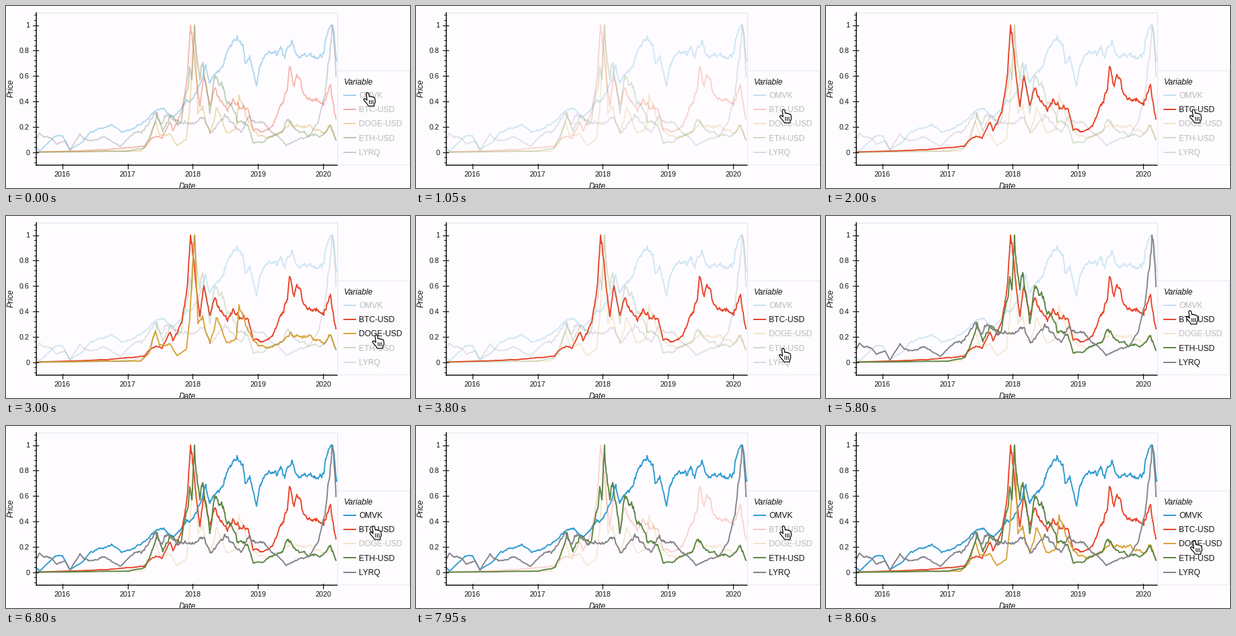
These frames come from a looping animation (600x271 px, 8.65 s). A matplotlib script:

```python
import numpy as np
import matplotlib.pyplot as plt
from matplotlib.animation import FuncAnimation
from matplotlib.patches import Polygon, Rectangle

W, H = 600, 271
STEP, FRAMES = 50, 173
PX = 0.72  # points per pixel at 100 dpi
LEFT, RIGHT, TOP, BOTTOM = 45.3, 491.5, 10, 236.5
ZERO, ONE = 217.7, 28.5
ROW0, ROW_H = 132.7, 21.25
INK, PALE, PAPER = "#111111", "#b9b9bb", "#fefcff"
MUTED, FADE = 0.22, 700

# name, colour, volatility, turning points in stage pixels
SERIES = [
    ("OMVK", "#2f9bd1", 0.014, [
        (45, 211), (50, 216), (72, 195), (84, 193), (95, 214), (114, 202),
        (126, 187), (157, 176), (172, 188), (220, 158), (235, 154), (248, 165),
        (268, 140), (279, 135), (297, 92), (303, 112), (326, 77), (343, 44),
        (352, 57), (355, 85), (362, 74), (372, 119), (377, 90), (408, 60),
        (414, 78), (425, 51), (432, 73), (469, 77), (485, 29), (491, 82)]),
    ("BTC-USD", "#e9452b", 0.024, [
        (45, 217.5), (125, 215), (205, 209), (222, 194), (232, 197), (244, 173),
        (248, 186), (261, 158), (270, 95), (274, 28), (288, 150), (294, 104),
        (303, 148), (311, 122), (329, 157), (337, 138), (347, 152), (360, 154),
        (367, 185), (396, 178), (409, 148), (418, 125), (421, 90), (428, 120),
        (432, 102), (448, 138), (472, 148), (482, 117), (490, 168)]),
    ("DOGE-USD", "#daa43a", 0.03, [
        (45, 217.6), (200, 216), (212, 205), (222, 171), (228, 193), (243, 190),
        (254, 208), (268, 197), (273, 150), (280, 28), (285, 160), (293, 155),
        (303, 190), (312, 152), (329, 188), (342, 183), (346, 132), (356, 163),
        (375, 193), (396, 194), (424, 176), (472, 191), (482, 177), (490, 198)]),
    ("ETH-USD", "#5c8542", 0.03, [
        (45, 217.6), (181, 216.3), (207, 210), (224, 160), (233, 187),
        (243, 164), (260, 172), (273, 92), (276, 110), (280, 28), (288, 110),
        (292, 85), (303, 158), (310, 104), (325, 130), (344, 172), (360, 180),
        (367, 204), (385, 200), (410, 187), (420, 171), (430, 184), (466, 195),
        (482, 178), (490, 200)]),
    ("LYRQ", "#848489", 0.03, [
        (45, 198), (50, 190), (66, 196), (75, 206), (88, 201), (95, 215),
        (110, 190), (122, 201), (148, 196), (170, 209), (196, 187), (223, 159),
        (229, 175), (243, 163), (257, 176), (294, 166), (303, 188), (324, 165),
        (350, 187), (361, 164), (385, 176), (416, 208), (450, 194), (464, 172),
        (474, 130), (484, 28), (490, 105)]),
]

# Fingertip rests: arrival and departure in ms, x, y
RESTS = np.array([
    (0, 300, 537, 129), (1000, 2000, 546, 154), (2400, 3400, 550, 177),
    (3850, 4200, 545, 198), (4600, 4650, 540, 146), (5100, 5450, 546, 217),
    (5900, 6250, 540, 130), (6700, 8200, 546, 149), (8450, 8650, 547, 171),
])
CLICK_TIMES = [1350, 2450, 3350, 4050, 5200, 6100, 6850, 8200, 8500]

HAND = np.array([
    (-2, 1.3), (-1, 0), (0.6, 0), (1.7, 1.3), (2.5, 6), (4, 5.2), (5.6, 6.4),
    (7.2, 5.8), (8.6, 7.2), (10.2, 7.2), (11, 9), (11.4, 14), (10, 17),
    (9.7, 20), (1.3, 20), (-0.5, 17), (-4.8, 12.2), (-5.8, 9.8), (-4, 8.8),
    (-0.8, 11.2),
])
CREASES = [np.array([(x, 11.5), (x + 0.3, 16.5)]) for x in (2.6, 5.2, 7.8)]

plt.rcParams["font.family"] = "Liberation Sans"
fig = plt.figure(figsize=(W / 100, H / 100), dpi=100, facecolor=PAPER)
ax = fig.add_axes([0, 0, 1, 1])
ax.set_xlim(0, W)
ax.set_ylim(H, 0)
ax.axis("off")


def line(xs, ys, color, width, z=2, **kw):
    return ax.plot(xs, ys, color=color, lw=width * PX, zorder=z, **kw)[0]


def label(x, y, s, size=12, **kw):
    kw = {"color": INK, "va": "baseline", **kw}
    return ax.text(x, y, s, fontsize=size * PX, zorder=6, **kw)


def price_path(points, vol, seed):
    """Random walk pinned to the turning points, rougher at higher prices."""
    px, py = np.array(points).T
    x = np.union1d(np.arange(px[0], px[-1], 0.8), px)
    walk = np.random.default_rng(seed).normal(size=x.size).cumsum()
    walk -= np.interp(x, px, np.interp(px, x, walk))
    y = np.interp(x, px, py)
    return x, np.clip(y + vol * walk * (ZERO - y), ONE, ZERO)


def draw_axes():
    line([LEFT, RIGHT, RIGHT], [TOP, TOP, BOTTOM], "#e4e2e6", 1, 1)
    line([LEFT, LEFT], [TOP, BOTTOM], INK, 1.5, 4)
    line([LEFT, RIGHT], [BOTTOM, BOTTOM], INK, 1.5, 4)
    for k in range(-2, 28):
        y = ZERO - 0.04 * k * (ZERO - ONE)
        if k % 5:
            line([42, LEFT], [y, y], INK, 1, 4)
        else:
            line([39.5, 47.5], [y, y], INK, 1.2, 4)
            label(35, y + 3.8, f"{0.04 * k:.1g}", 10.8, ha="right")
    for k in range(5):
        x = 83.8 + 96.8 * k
        line([x, x], [234.5, 242], INK, 1.2, 4)
        label(x, 254.5, str(2016 + k), 10.8, ha="center")
    label(269, 272, "Date", style="italic", ha="center")
    label(7.3, 122.5, "Price", style="italic", rotation=90, ha="center", va="center")


def draw_series():
    ax.add_patch(Rectangle((492, 96), 106.5, 140, fc=PAPER, ec="#e9e7ec",
                           lw=PX, zorder=5))
    label(502, 117, "Variable", style="italic")
    rows = []
    for i, (name, color, vol, points) in enumerate(SERIES):
        y = ROW0 + ROW_H * i
        plot = line(*price_path(points, vol, i + 3), color, 1.9, 2 + 0.1 * i,
                    solid_joinstyle="round")
        key = line([501, 519.5], [y, y], color, 2, 6, solid_capstyle="butt")
        rows.append((plot, key, label(524, y + 4.2, name)))
    return rows


def fingertip(t):
    arrive, leave = RESTS[:, 0], RESTS[:, 1]
    i = np.searchsorted(arrive, t, side="right") - 1
    if t <= leave[i]:
        return RESTS[i, 2:]
    u = (t - leave[i]) / (arrive[i + 1] - leave[i])
    u = u * u * (3 - 2 * u)
    return RESTS[i, 2:] * (1 - u) + RESTS[i + 1, 2:] * u


def row_under(tip):
    return round((tip[1] - ROW0) / ROW_H)


draw_axes()
rows = draw_series()
clicks = [(t, row_under(fingertip(t))) for t in CLICK_TIMES]
hand = Polygon(HAND, fc="white", ec="black", lw=1.2 * PX, joinstyle="round", zorder=9)
ax.add_patch(hand)
creases = [line([], [], "black", 1, 10) for _ in CREASES]


def update(n):
    t = n * STEP
    faint = MUTED + 0.15 * max(0, 1 - t / FADE)
    for i, (plot, key, text) in enumerate(rows):
        on = sum(k == i and t >= when for when, k in clicks) % 2
        plot.set_alpha(1 if on else faint)
        key.set_alpha(1 if on else faint + 0.06)
        text.set_color(INK if on else PALE)
    tip = fingertip(t)
    hand.set_xy(HAND + tip)
    for crease, shape in zip(creases, CREASES):
        crease.set_data(*(shape + tip).T)
    return []


anim = FuncAnimation(fig, update, frames=FRAMES, interval=STEP,
                     repeat=True, repeat_delay=0)
plt.show()
```
